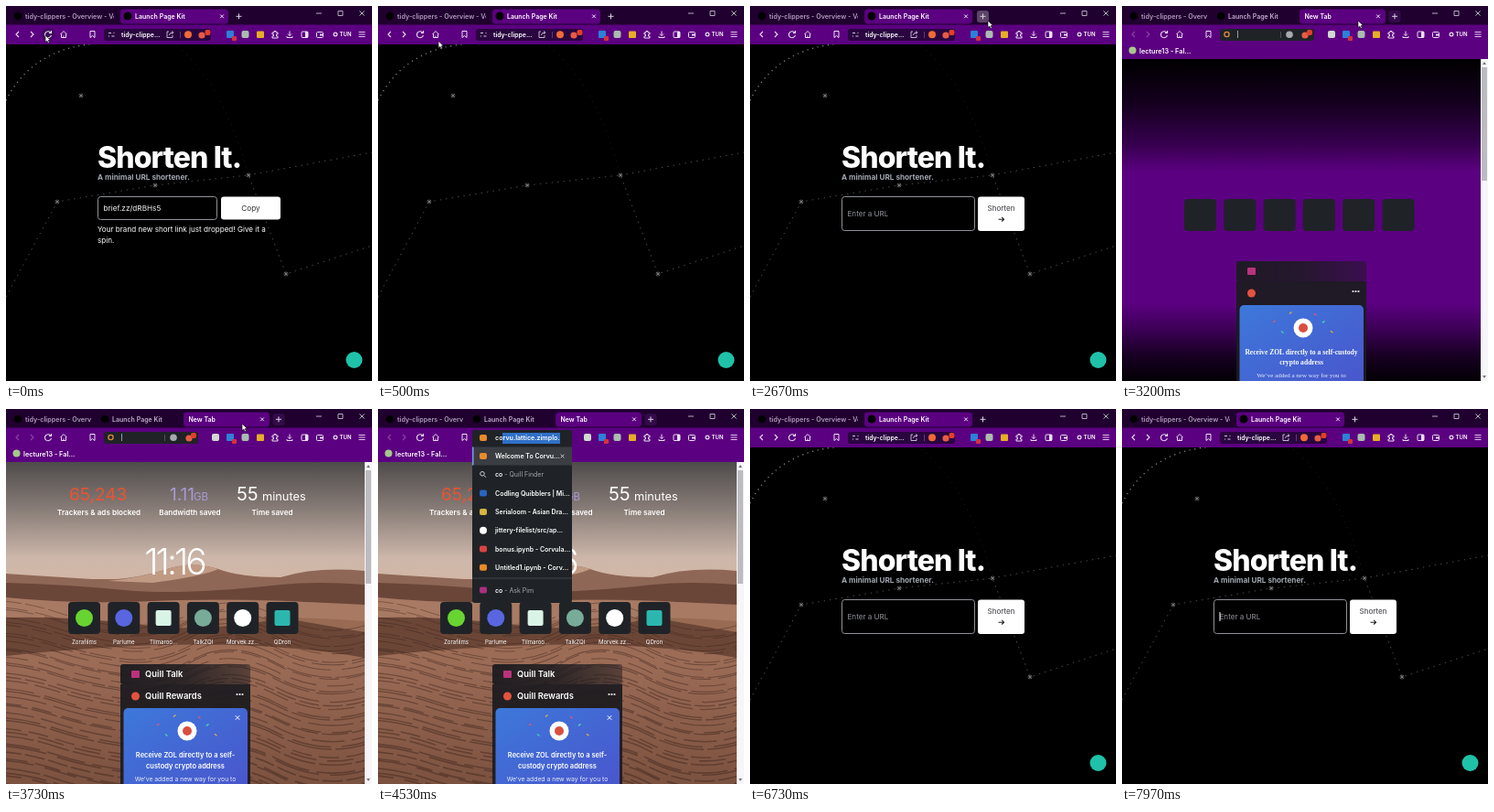
These frames come from a looping animation (400 px wide and 410 px high, 8000 ms). An HTML page:

```html
<!DOCTYPE html>
<html lang="en">
<head>
<meta charset="utf-8">
<title>Link page</title>
<style>
html, body { margin: 0; width: 100%; height: 100%; overflow: hidden; background: #000; }
#stage { position: relative; width: 400px; height: 410px; overflow: hidden; font-family: Inter, sans-serif; }
svg { position: absolute; left: 0; top: 0; }
text { white-space: pre; }
.url { position: absolute; left: 128px; top: 26px; width: 76px; height: 12px; overflow: hidden;
  font: 600 7.1px/12px Inter, sans-serif; color: #fff; white-space: pre; }
.url mark { display: inline-block; height: 12px; background: #2f70c8; color: #fff; }
.enter { animation: enter 8s linear infinite; }
@keyframes enter {
  0%, 6.25% { opacity: 0; transform: translateY(-20px); }
  12.5%, 100% { opacity: 1; transform: none; }
}
.tab { animation: tab 8s ease-out infinite; }
@keyframes tab {
  0%, 34.6% { opacity: 0; transform: translateX(-24px); }
  37.5%, 100% { opacity: 1; transform: none; }
}
.photo { animation: photo 8s linear infinite; }
@keyframes photo { 0%, 42.2% { opacity: 0; } 46.5%, 100% { opacity: 1; } }
.cursor { animation: cursor 8s ease-in-out infinite; }
@keyframes cursor {
  0%, 4% { transform: translate(43px, 32px); }
  11.6%, 15% { transform: translate(168px, 66px); }
  21.6% { transform: translate(190px, 58px); }
  31.6% { transform: translate(258px, 17px); }
  33.4% { transform: translate(260px, 16px); }
  40%, 89% { transform: translate(258px, 16px); }
  98%, 100% { transform: translate(136px, 224px); }
}
</style>
</head>
<body>
<div id="stage"></div>
<script>
const LOOP = 8000;
const PURPLE = '#5b0080', STRIP = '#20002f', BAR = '#2a0540', INK = '#1f2327';
let rules = '', count = 0;

// Visible only within the given [from, to] spans of the loop
function during(...spans) {
  const id = 'w' + count++;
  let keys = spans[0][0] ? '0%{opacity:0}' : '';
  for (const [a, b] of spans) {
    keys += `${a / LOOP * 100}%{opacity:1}`;
    keys += `${b / LOOP * 100}%{opacity:${b < LOOP ? 0 : 1}}`;
  }
  rules += `@keyframes ${id}{${keys}}`;
  return `style="animation:${id} 8s step-end infinite"`;
}
const group = (attrs, ...parts) => `<g ${attrs}>${parts.join('')}</g>`;
const text = (x, y, s, size, fill = '#fff', more = '') =>
  `<text x="${x}" y="${y}" font-size="${size}" fill="${fill}" ${more}>${s}</text>`;
const rect = (x, y, w, h, fill, r = 0, more = '') =>
  `<rect x="${x}" y="${y}" width="${w}" height="${h}" rx="${r}" fill="${fill}" ${more}/>`;
const dot = (x, y, r, fill) => `<circle cx="${x}" cy="${y}" r="${r}" fill="${fill}"/>`;
const line = (d, stroke = '#fff', w = 1, more = '') =>
  `<path d="${d}" fill="none" stroke="${stroke}" stroke-width="${w}" ${more}/>`;
const shape = (d, fill) => `<path d="${d}" fill="${fill}"/>`;
const cross = (x, y, r, c, w = 1) => line(`M${x - r} ${y - r}l${2 * r} ${2 * r}m0 ${-2 * r}l${-2 * r} ${2 * r}`, c, w);
const plus = (x, y) => line(`M${x - 3} ${y}h6m-3-3v6`, '#ded0e6');
const BOLD = 'font-weight="600"', MID = 'text-anchor="middle"', BOLD_MID = BOLD + ' ' + MID;

// Browser frame
function frame() {
  return rect(0, 0, 400, 21, STRIP) +
    line('M339 8h6M363 5.500h5v5h-5z', '#c8bccf', .9) + cross(389, 8, 2.6, '#c8bccf', .9) +
    rect(0, 20.500, 400, 21.500, PURPLE);
}
function tools(dim) {
  const c = '#eadff0';
  return line('M14 28l-3 3 3 3', dim ? '#8a45a5' : c, 1.1) +
    line('M27 28l3 3-3 3', dim ? '#8a45a5' : c, 1.1) +
    line('M48.700 29a3.500 3.500 0 1 0 .7 3M49.500 27v2.500h-2.500', c, 1.1) +
    line('M59.500 31l3.500-3.500 3.500 3.500M60.500 30.500v4h5v-4M63 34.500v-2', c) +
    line('M92 27.500h5v7l-2.500-2-2.500 2z', c) +
    rect(241, 27, 8, 8, '#2d80d8', 1) + rect(247, 33, 5, 5, '#d4323c', 1) +
    rect(257.500, 27, 8, 8, '#a9bcae', 2) +
    rect(274, 27.500, 8, 7.500, '#e6ad25', 1) +
    line('M291 29h2v-1.500h2V29h2v2h-1.500v2H297v2h-6v-2h1.500v-2H291z', c) +
    line('M310 27.500v5m-2-2l2 2 2-2M307 33v1.500h6V33', c) +
    rect(323, 28, 7, 6.500, 'none', 1, `stroke="${c}"`) + rect(327, 28, 3, 6.500, c) +
    rect(339.500, 28.500, 7, 6, 'none', 1, `stroke="${c}"`) + rect(343, 30.500, 4, 2, c) +
    `<circle cx="360" cy="31" r="1.900" fill="none" stroke="${c}" stroke-width="1.200"/>` +
    text(364.500, 33.300, 'TUN', 6, '#fff', BOLD) +
    line('M385.500 28.500h7m-7 2.500h7m-7 2.500h7', c, .9);
}
const badge = (x, y) => rect(x, y, 6, 6, '#e2402a', 2);

function twoTabs() {
  return frame() + rect(125, 3.500, 118, 16, PURPLE, 4) +
    dot(13, 11, 4.3, '#000') + dot(133, 11, 4.5, '#000') +
    group('clip-path="url(#tabClip)"', text(21, 14, 'tidy-clippers - Overview - Ve', 7.2, '#b09abb', BOLD)) +
    text(141, 14, 'Launch Page Kit', 7, '#fff', BOLD) + cross(236, 11.300, 1.900, '#eadff0') +
    group(during([2560, 2770]), rect(248, 5, 13, 13, '#5d4568', 3)) + plus(254.500, 11.300) +
    group(during([0, 430]), dot(46, 31, 7, '#3f0a5e')) +
    rect(107, 25, 117, 13, BAR, 3) +
    line('M112 29.500h3m2.500 0h1M112 33h1m2.500 0h3', '#d4c8dd') +
    text(126, 33.600, 'tidy-clippe...', 6.900, '#fff', BOLD) +
    line('M178 28h-2v6.500h6V32M178.500 32q0-3 4-3m-1.500-1.500l2 1.500-2 1.500', '#d4c8dd', .9) +
    line('M190.500 28v7', '#6a4c80', .8) + dot(199, 31.300, 4, '#ef6a37') + dot(214, 32, 3.600, '#e65b45') + badge(217.500, 26) +
    tools();
}

function threeTabs() {
  return frame() + dot(13, 11, 4.3, '#000') + dot(108, 11, 4.3, '#000') +
    group('clip-path="url(#narrowClip)"', text(21, 14, 'tidy-clippers - Overview', 7.2, '#b09abb', BOLD)) +
    text(116, 14, 'Launch Page Kit', 7, '#c2aecd', BOLD) +
    group('class="tab"', rect(194, 3.500, 94, 16, PURPLE, 4), text(199.500, 14, 'New Tab', 7, '#fff', BOLD),
      cross(280, 11.300, 1.900, '#eadff0')) +
    rect(291.500, 5, 13, 13, '#340a49', 3) + plus(298, 11.300) +
    rect(107, 25, 103, 13, INK, 3) +
    `<circle cx="114.500" cy="31" r="2.600" fill="none" stroke="#df8b42" stroke-width="1.300"/>` +
    line('M126.500 27v8', '#bbb', .8) + line('M173.500 28v7', '#5d5f66', .8) +
    dot(183, 31.300, 3.800, '#a9aaae') + dot(200, 32, 3.600, '#e65b45') + badge(202, 26) +
    tools(true) + rect(225, 27, 8, 8, '#d0d8d0', 2) +
    rect(0, 41.500, 400, 16.500, PURPLE) + dot(11.500, 48.500, 4, '#a5c98a') +
    text(19, 51.500, 'lecture13 - Fal...', 7.3, '#fff', BOLD);
}

// Dark link page
function sky() {
  let s = line('M0 103C18 68 50 43 104 41', '#8d8f92', 1.2, 'stroke-dasharray="1.200 4.500"');
  s += line('M0 318L56 214L163 196L265 185L306 293L400 262M265 185L400 160', '#535459', .9, 'stroke-dasharray="1.500 5"');
  s += line('M187 44Q238 85 265 185', '#28292d', .8, 'stroke-dasharray="1 6"');
  for (const [x, y] of [[82, 98], [56, 214], [163, 196], [265, 185], [306, 293]])
    s += line(`M${x - 2.500} ${y}h5M${x} ${y - 2.500}v5M${x - 2} ${y - 2}l4 4m0-4l-4 4`, '#85878c', .7);
  return s;
}
const heading = () => text(100, 177, 'Shorten It.', 32, '#fff', 'font-weight="800" letter-spacing="-.9"') +
  text(100, 189.500, 'A minimal URL shortener.', 8.2, '#a1a7b0', 'font-weight="700"');
const field = (w, h) => rect(100.500, 208.500, w, h, '#000', 3, 'stroke="#8f9299"');

function linkPage() {
  return rect(0, 42, 400, 368, '#000') +
    group(during([0, 380], [500, LOOP]), sky()) +
    group(during([0, 380]), heading(), field(130, 25),
      text(106.500, 224, 'brief.zz/dRBHs5', 8.2, '#f5f5f7'),
      rect(235, 208.500, 65, 25, '#fff', 3), text(267.500, 224, 'Copy', 8.2, '#303136', MID),
      text(100, 247, 'Your brand new short link just dropped! Give it a', 8.1),
      text(100, 259, 'spin.', 8.1)) +
    group('class="enter"', heading(), field(145, 37),
      text(106.500, 230, 'Enter a URL', 8.1, '#90939b'),
      rect(249, 208.500, 51, 37.500, '#fff', 3), text(274.500, 223.700, 'Shorten', 8.1, '#393a40', MID),
      line('M271.500 233.200h6m-2.300-2.300l2.300 2.300-2.300 2.300', '#222', 1.1)) +
    group(during([7870, LOOP]), line('M107 222v10', '#fff', 1)) +
    dot(380.500, 387, 9, '#1fc2a8');
}

// New tab page
function dunes() {
  let s = rect(0, 58, 392, 140, 'url(#dusk)') + rect(0, 186, 392, 224, 'url(#sand)');
  s += shape('M0 180Q60 184 112 187Q150 184 176 175Q204 166 232 175Q256 184 300 184Q340 172 392 177V222H0Z', '#8f6756');
  s += shape('M112 188Q150 184 176 175Q204 166 232 175Q215 183 160 190Z', '#c19a84');
  s += shape('M0 190Q70 192 130 198T300 192Q340 188 392 192V216Q250 202 150 214T0 206Z', '#6a4639');
  s += shape('M0 206Q80 214 160 210T392 214V232Q250 222 140 236T0 228Z', '#a97a63');
  s += shape('M0 228Q70 226 150 236T300 228L392 244V272Q240 244 0 270Z', '#6b4637');
  // wind ripples, finer near the horizon
  for (let i = 0; i < 44; i++) {
    const y = 232 + i * 5.5, k = 2 * Math.sin(i * 2.3);
    s += line(`M-5 ${y + k - 22}q30 2 60 12t70 16t80-16t90 4t100 10`, '#3a221b', .9 + i * .025,
      `opacity=".45" stroke-dasharray="${22 + i % 5 * 7} ${4 + i % 3 * 4}"`);
  }
  return s;
}
function stats() {
  const lab = (x, s) => text(x, 116, s, 8.1, '#fff', BOLD_MID);
  return text(69, 100, '65,243', 19, '#ec5330') + lab(101.500, 'Trackers &amp; ads blocked') +
    text(179, 100, '1.11', 19, '#a79ad6') + text(205, 100, 'GB', 11.500, '#a79ad6') + lab(201, 'Bandwidth saved') +
    text(252, 100, '55', 20) + text(280, 100, 'minutes', 12.800) + lab(291, 'Time saved') +
    text(184, 181, '11:16', 39, '#fff', MID + ' font-weight="300" letter-spacing="-3"');
}
function newTabPage() {
  const sites = [['Zorafilms', '#68d432'], ['Parlume', '#5966e0'], ['Tilmaroo...', '#d9f3e6'],
    ['TalkZQI', '#78ab98'], ['Morvek.zz...', '#fff'], ['QDron', '#2cb7ae']];
  let tiles = '', marks = '';
  sites.forEach(([name, c], i) => {
    const x = 85.500 + i * 43.300;
    tiles += rect(x - 17.500, 211, 35, 35, INK, 4);
    marks += (i === 2 || i === 5 ? rect(x - 8.500, 220, 17, 17, c, 2) : dot(x, 228.500, 9.500, c)) +
      text(x, 257, name, 6.1, '#fff', MID);
  });
  let bits = '';
  ['#e4586f', '#47d6b0', '#e5b040', '#8a7bf0', '#47d6b0', '#e4586f', '#47d6b0', '#e5b040'].forEach((c, i) => {
    const x = 165 + i * 9, y = 346 + 11 * Math.sin(i * 2.1);
    bits += line(`M${x} ${y}l2.500 ${i % 2 ? 2 : -2}`, c, 1.300);
  });
  const serif = 'font-family="Liberation Serif, serif" ' + MID;
  return rect(0, 58, 392, 352, 'url(#load)') +
    group('class="photo"', dunes(), stats()) + tiles +
    group('class="photo"', marks) +
    rect(125, 279, 142, 22, 'url(#head)', 3) + rect(125, 301, 142, 109, '#1c1b20', 0, 'opacity=".93"') +
    rect(137, 286, 9, 8, '#b9327c', 1) + dot(141.500, 314, 4.500, '#e4533f') +
    [252.500, 255.500, 258.500].map(x => dot(x, 312, 1.1, '#eee')).join('') +
    rect(128.500, 327, 135.500, 90, 'url(#card)', 5) + bits + dot(198, 352, 10.500, '#fff') + dot(198, 352, 5, '#d94f40') +
    group(during([2770, 3470]),
      text(196, 380.500, 'Receive ZOL directly to a self-custody', 7.6, '#fff', serif + ' font-weight="700"'),
      text(196, 392, 'crypto address', 7.6, '#fff', serif + ' font-weight="700"'),
      text(196, 406, 'We’ve added a new way for you to', 7, '#e8edfa', serif)) +
    group(during([3470, 6500]),
      text(152, 293.300, 'Quill Talk', 9.4, '#fff', BOLD), text(152, 317.300, 'Quill Rewards', 9.4, '#fff', BOLD),
      cross(253, 337.500, 2.300, '#fff'),
      text(196, 381, 'Receive ZOL directly to a self-', 7.500, '#fff', BOLD_MID),
      text(196, 393, 'custody crypto address', 7.500, '#fff', BOLD_MID),
      text(196, 406.500, 'We’ve added a new way for you to', 6.800, '#e8edfa', MID)) +
    rect(392, 58, 8, 352, '#f6f5f8') + rect(393, 67, 6, 124, '#bcbbc0') +
    shape('M394 64h4l-2-3zM394 404h4l-2 3z', '#77767d');
}

// Address suggestions
function lens(y) {
  return `<circle cx="114" cy="${y - 1}" r="2.300" fill="none" stroke="#ccc"/>` + line(`M116 ${y + 1}l2 2`, '#ccc');
}
function panel(h, rows) {
  let s = rect(103, 23, 109, h, INK, 3) + rect(103, 41.500, 109, 20, '#3a3d42') +
    rect(103, 41.500, 1.500, 20, '#6fa1e8') + cross(201.500, 51.500, 1.800, '#ddd', .9);
  rows.forEach(([label, c, tail, y], i) => {
    y = y || 51.500 + i * 20.300;
    s += c ? (c === '#fff' ? dot(115, y, 4, c) : rect(111, y - 3.500, 8, 7, c, 2)) : lens(y);
    s += text(128, y + 2.600, label + (tail ? `<tspan fill="#a5a6ab" font-weight="400"> - ${tail}</tspan>` : ''), 7, '#fff', BOLD);
  });
  return s;
}
function suggestions() {
  const orange = '#e98a2a', blue = '#2965c0';
  return group(during([3970, 4230]), rect(103, 23, 109, 17, INK, 3), rect(111, 28, 8, 7, orange, 2)) +
    group(during([4230, 4670]), panel(189, [
      ['Welcome To Corvu...', orange], ['co', '', 'Quill Finder'], ['Codling Quibblers | Mi...', blue],
      ['Serialoom - Asian Dra...', '#d6b540'], ['jittery-filelist/src/ap...', '#fff'],
      ['bonus.ipynb - Corvula...', '#d9433f'], ['Untitled1.ipynb - Corv...', orange],
      ['co', '#a8307e', 'Ask Pim', 198]]),
      rect(111, 28, 8, 7, orange, 2), line('M103 185h109', '#4a4d52', .8)) +
    group(during([4670, 6370]), panel(63, [['Codling Quibbler...', blue], ['codlingquibblers.pil...', '']]),
      rect(111, 28, 8, 7, blue, 2));
}
const site = 'codlingquibblers.pilflit.zzz', first = 'corvu.lattice.zimplo.';
const typing = [[3970, 4230, first, 1], [4230, 4670, first, 2], [4670, 4735, site, 3], [4735, 4800, site, 4],
  [4800, 5030, site, 5], [5030, 5300, site, 6], [5300, 5570, site, 7]];
const url = (a, b, head, tail) => `<div class="url" ${during([a, b])}>${head}<mark>${tail}</mark></div>`;

const stop = ([at, c, a = 1]) => `<stop offset="${at}" stop-color="${c}" stop-opacity="${a}"/>`;
const grad = (id, stops, dir = 'x2="0" y2="1"') => `<linearGradient id="${id}" ${dir}>${stops.map(stop).join('')}</linearGradient>`;
const defs = '<defs>' +
  '<clipPath id="tabClip"><rect x="21" width="97" height="21"/></clipPath>' +
  '<clipPath id="narrowClip"><rect x="21" width="72" height="21"/></clipPath>' +
  grad('load', [[0, '#000'], [.14, '#15001f'], [.26, '#35004c'], [.35, PURPLE],
    [.76, PURPLE], [.84, '#3c0056'], [.92, '#180023'], [1, '#030005']]) +
  grad('dusk', [[0, '#4f4b4b'], [.35, '#857a75'], [.75, '#cdb7aa'], [1, '#d5b7a4']]) +
  grad('sand', [[0, '#96694f'], [.4, '#9c6c56'], [1, '#7b513f']]) +
  grad('head', [[0, '#1c1b20', .95], [.5, '#1c1b20', .85], [1, '#1c1b20', .5]], 'x2="1" y2="0"') +
  grad('card', [[0, '#3d78da'], [1, '#4a55cc']], 'x2="1" y2="1"') + '</defs>';
const svg = body => `<svg width="400" height="410" viewBox="0 0 400 410">${body}</svg>`;

const main = group(during([0, 2770], [6500, LOOP]), linkPage(), twoTabs()) +
  group(during([2770, 6500]), newTabPage(), threeTabs(), suggestions());
const pointer = group(during([0, 3970], [7000, 7870]), group('class="cursor"',
  '<path d="M0 0V7.500L1.800 6 3.100 8.700 4.400 8.100 3.200 5.500H5.600Z" fill="#fff" stroke="#000" stroke-width=".6"/>'));

const html = svg(defs + main) +
  typing.map(([a, b, s, n]) => url(a, b, s.slice(0, n), s.slice(n))).join('') +
  url(5570, 6370, '', site.slice(8)) + svg(pointer);
const style = document.createElement('style');
style.textContent = rules;
document.head.append(style);
document.getElementById('stage').innerHTML = html;
</script>
</body>
</html>
```
